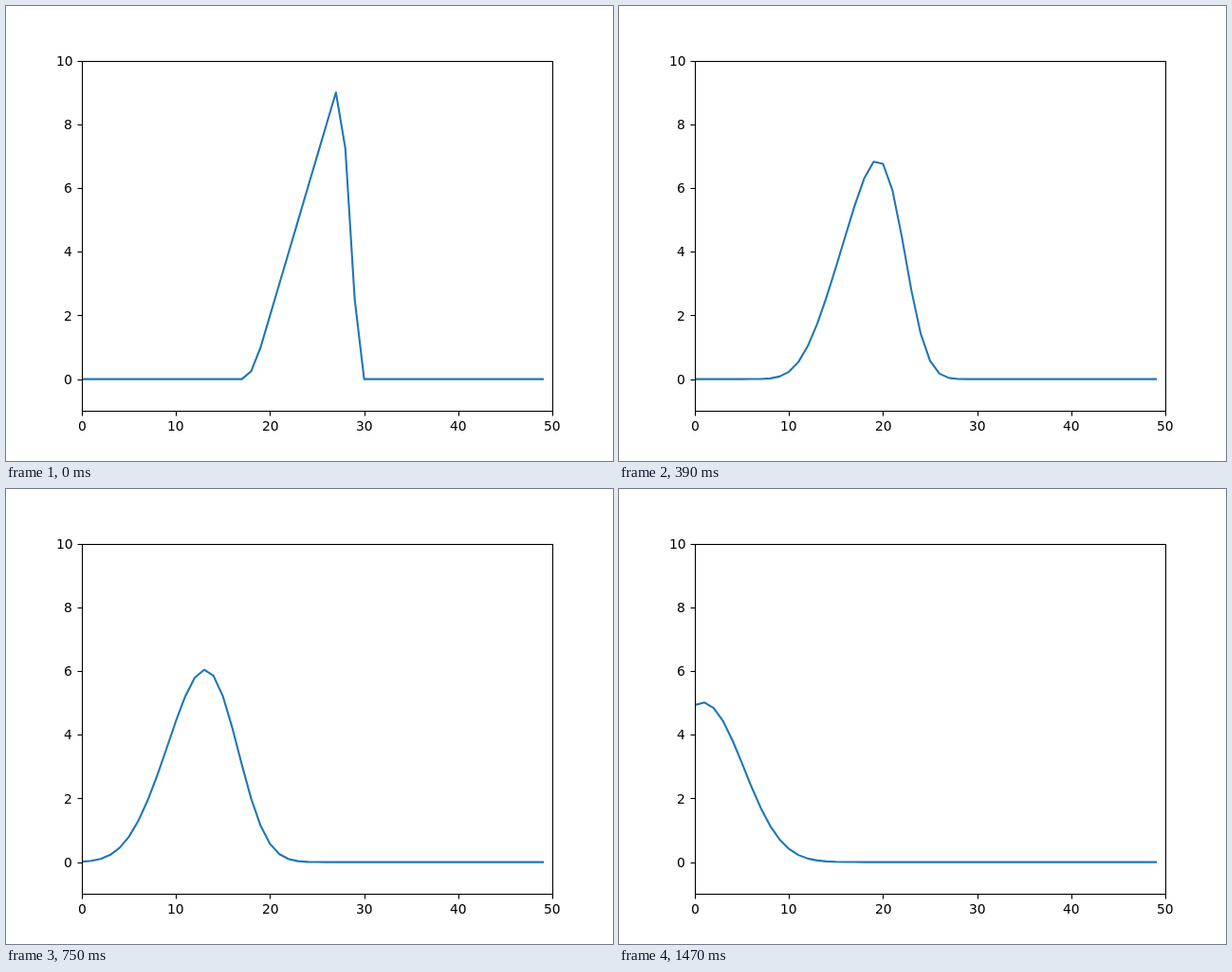
Recreate the animation shown at these times as an HTML page with a canvas. Size 640 by 480 pixels, loop 1.5 s.

```html
<!DOCTYPE html>
<html lang="en">
<head>
<meta charset="utf-8">
<title>Upwind advection</title>
<style>
  html, body { margin: 0; width: 100%; height: 100%; overflow: hidden; background: #fff; }
  canvas { display: block; }
</style>
</head>
<body>
<canvas id="plot" width="640" height="480"></canvas>
<script>
const ctx = document.getElementById('plot').getContext('2d');

const FRAME_MS = 30, FRAMES = 50, CELLS = 50;
const PX_PER_PT = 100 / 72;
const AXES = { left: 80, right: 576, top: 57.6, bottom: 427.2 };

const xOf = v => AXES.left + v * (AXES.right - AXES.left) / 50;
const yOf = v => AXES.bottom - (v + 1) * (AXES.bottom - AXES.top) / 11;
const snap = p => Math.floor(p + 0.5) + 0.5;

// Ramp 1..10 on cells 20..29, carried left at Courant number 0.5.
const advect = u => u.map((v, i) => 0.5 * v + 0.5 * (u[i + 1] ?? 0));
const ramp = Array.from({ length: CELLS }, (_, i) => i >= 20 && i < 30 ? i - 19 : 0);
const states = [advect(advect(ramp))];
while (states.length < FRAMES) states.push(advect(states[states.length - 1]));

function segment(x1, y1, x2, y2) {
  ctx.beginPath();
  ctx.moveTo(x1, y1);
  ctx.lineTo(x2, y2);
  ctx.stroke();
}

function drawCurve(u) {
  ctx.save();
  ctx.beginPath();
  ctx.rect(80, 58, 496, 369);
  ctx.clip();
  ctx.beginPath();
  u.forEach((v, i) => ctx.lineTo(xOf(i), yOf(v)));
  ctx.strokeStyle = '#1f77b4';
  ctx.lineWidth = 1.5 * PX_PER_PT;
  ctx.lineJoin = 'round';
  ctx.lineCap = 'square';
  ctx.stroke();
  ctx.restore();
}

function drawAxes() {
  const left = snap(AXES.left), right = snap(AXES.right);
  const top = snap(AXES.top), bottom = snap(AXES.bottom);
  const labelGap = 7 * PX_PER_PT;

  ctx.strokeStyle = ctx.fillStyle = '#000';
  ctx.lineWidth = 0.8 * PX_PER_PT;
  ctx.font = `${10 * PX_PER_PT}px "DejaVu Sans", sans-serif`;
  ctx.strokeRect(left, top, right - left, bottom - top);

  for (let v = 0; v <= 50; v += 10) {
    const x = snap(xOf(v)), width = ctx.measureText(v).width;
    segment(x, bottom, x, bottom + 5);
    ctx.fillText(v, Math.round(xOf(v) - width / 2), 448);
  }
  for (let v = 0; v <= 10; v += 2) {
    const y = snap(yOf(v)), width = ctx.measureText(v).width;
    segment(left, y, left - 5, y);
    ctx.fillText(v, Math.round(AXES.left - labelGap - width), Math.round(yOf(v) + 5.27));
  }
}

function draw(time) {
  const frame = Math.floor(Math.max(0, time) / FRAME_MS) % FRAMES;
  ctx.fillStyle = '#fff';
  ctx.fillRect(0, 0, 640, 480);
  drawCurve(states[frame]);
  drawAxes();
}

const start = performance.now();
function tick(now) {
  draw(now - start);
  requestAnimationFrame(tick);
}
draw(0);
requestAnimationFrame(tick);
</script>
</body>
</html>
```
